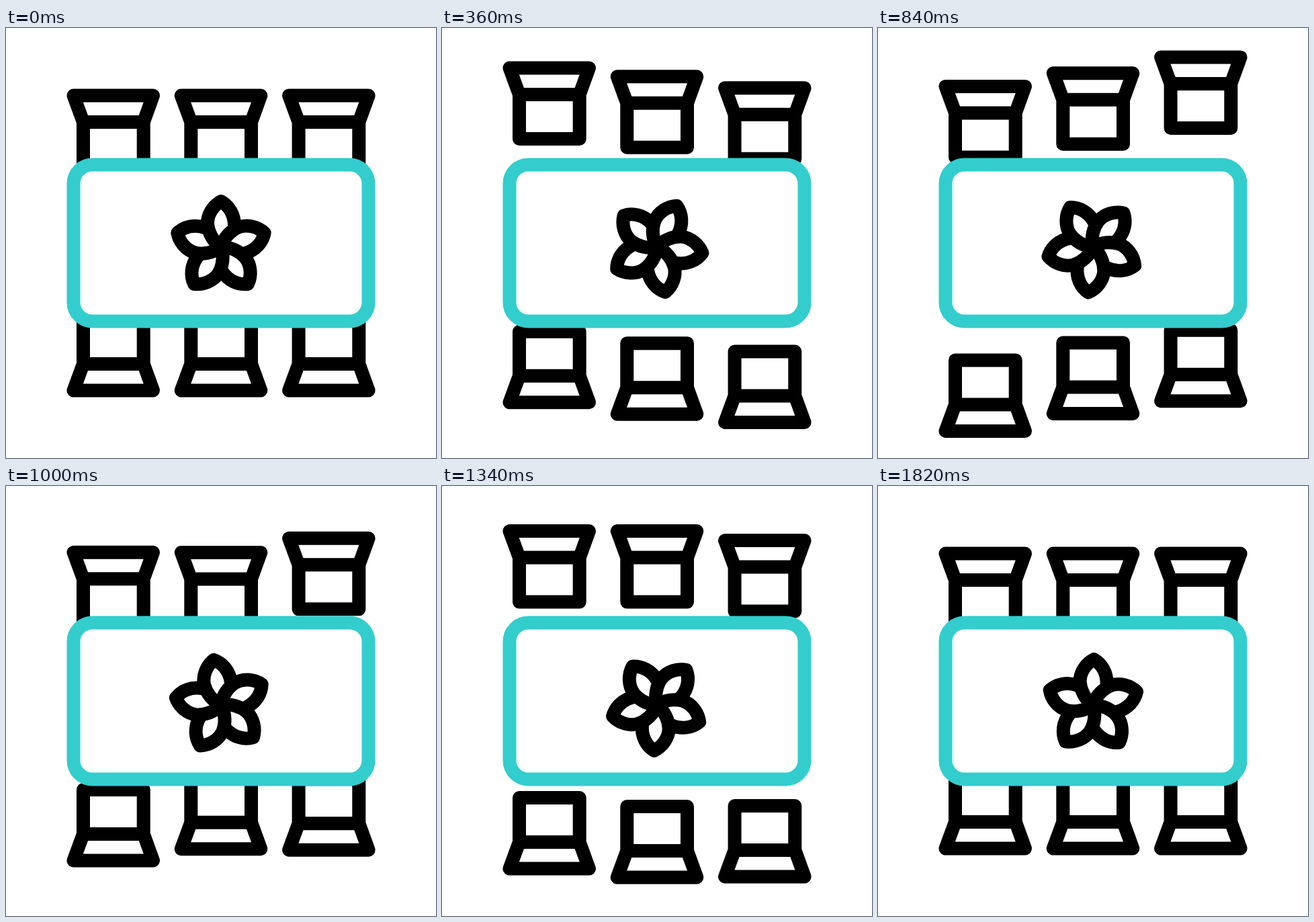
An HTML page that plays this animation: 640 by 640 pixels, repeating every 2.4 s.

```html
<!DOCTYPE html>
<html lang="en">
<head>
<meta charset="utf-8">
<title>Bouncing columns and flower</title>
<style>
  html, body { margin: 0; width: 100%; height: 100%; overflow: hidden; background: #fff; }
  svg { display: block; width: 100vw; height: 100vh; }
</style>
</head>
<body>
<svg viewBox="0 0 640 640" fill="none" stroke="#000" stroke-width="20" stroke-linejoin="round" stroke-linecap="round">
  <defs>
    <path id="column" d="M115 140 L100.5 100.5 H219 L204.7 140 Z V206 H204.7 V140"/>
    <path id="petal" d="M20 -31 C20.5 -48 12 -61.5 0 -68 C-12 -61.5 -20.5 -48 -20 -34 C-19 -22 -12 -8 0 0"/>
  </defs>
  <g id="columns"></g>
  <rect x="100.5" y="203.5" width="439" height="233" rx="28" fill="#fff" stroke="#33cdcd"/>
  <g id="flower"></g>
</svg>
<script>
const LOOP = 2400, REST = 1820, STEP = 20;

// Keys are [time in ms, value] pairs, eased in and out between neighbours.
const TOP_KEYS = [[0, 0], [583, 61], [953, 0], [1302, 35], [1594, 0]];
const BOTTOM_KEYS = [[0, 0], [583, 70.5], [953, 0], [1302, 44], [1594, 0]];
const SPIN_KEYS = [[0, 0], [475, -54.5], [1775, 73]];
const TOP_DELAYS = [0, 83, 200];
const BOTTOM_DELAYS = [169, 69, 0];
const SPACING = 160.3;

function valueAt(keys, t) {
  if (t <= keys[0][0]) return keys[0][1];
  for (let i = 1; i < keys.length; i++) {
    const [t0, v0] = keys[i - 1], [t1, v1] = keys[i];
    if (t < t1) {
      const x = (t - t0) / (t1 - t0);
      return v0 + (v1 - v0) * x * x * (3 - 2 * x);
    }
  }
  return keys[keys.length - 1][1];
}

function addUse(parent, id) {
  const use = document.createElementNS("http://www.w3.org/2000/svg", "use");
  use.setAttribute("href", "#" + id);
  return parent.appendChild(use);
}

const columnGroup = document.getElementById("columns");
const flower = document.getElementById("flower");
const tops = TOP_DELAYS.map(() => addUse(columnGroup, "column"));
const bottoms = BOTTOM_DELAYS.map(() => addUse(columnGroup, "column"));
for (let i = 0; i < 5; i++) {
  addUse(flower, "petal").setAttribute("transform", `rotate(${i * 72})`);
}

function render(t) {
  tops.forEach((top, i) => {
    const lift = valueAt(TOP_KEYS, t - TOP_DELAYS[i]);
    top.setAttribute("transform", `translate(${i * SPACING} ${-lift})`);
  });
  bottoms.forEach((bottom, i) => {
    const drop = valueAt(BOTTOM_KEYS, t - BOTTOM_DELAYS[i]);
    bottom.setAttribute("transform", `translate(${i * SPACING} ${640 + drop}) scale(1 -1)`);
  });
  flower.setAttribute("transform", `translate(320 326) rotate(${valueAt(SPIN_KEYS, t)})`);
}

const start = performance.now();
function frame() {
  const t = (performance.now() - start) % LOOP;
  render(Math.min(REST, Math.floor(t / STEP) * STEP));
  requestAnimationFrame(frame);
}
frame();
</script>
</body>
</html>
```
